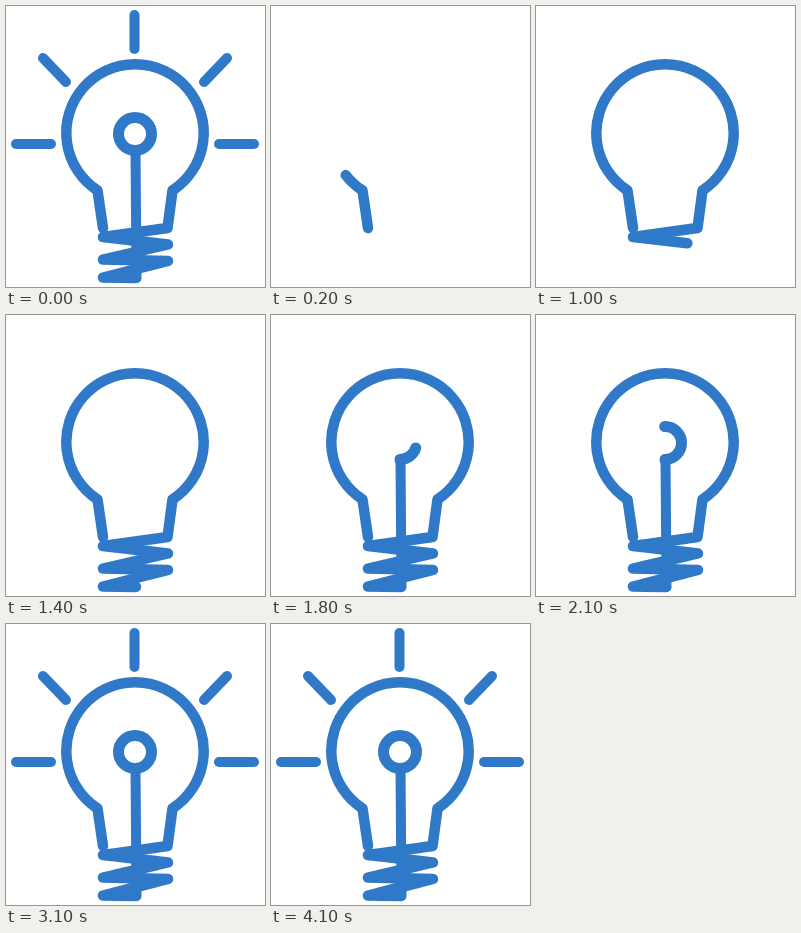
Write an HTML page that moves like this. It is 259 px wide and 281 px high and loops after 5100 ms.

```html
<!DOCTYPE html>
<html lang="en">
<head>
<meta charset="utf-8">
<title>Light bulb</title>
<style>
  html, body { margin: 0; width: 100%; height: 100%; overflow: hidden; background: #fff; }
  svg { display: block; width: 259px; height: 281px; }
  path { fill: none; stroke: #2f79c8; stroke-width: 10; stroke-linecap: round; stroke-linejoin: round; }
</style>
</head>
<body>
<svg viewBox="0 0 259 281"></svg>
<script>
const LOOP = 5100, STEP = 100;
const svg = document.querySelector('svg');

// path, start ms, end ms, stroke width
const parts = [
  ['M97 222L91.5 184.5A68.7 68.7 0 1 1 166.5 184.5L161.5 222L97 231L162 238.5L97 253.5L162 255L97 271.5L130 272',
    100, 1400, 10.5],
  ['M130.5 272L129.5 144', 1400, 1600, 10],
  ['M129 144.5A16.5 16.5 0 0 0 129 111.5A16.5 16.5 0 0 0 129 144.5', 1600, 2600, 11],
  ['M10 138H45', 2500, 2600, 10],
  ['M37 52L60 76', 2600, 2700, 10],
  ['M128.5 9V43', 2700, 2800, 10],
  ['M221 52L198 76', 2800, 2900, 10],
  ['M213 138H248', 2900, 3000, 10]
].map(([d, start, end, width]) => {
  const el = document.createElementNS('http://www.w3.org/2000/svg', 'path');
  el.setAttribute('d', d);
  el.style.strokeWidth = width;
  svg.append(el);
  return { el, start, end, length: el.getTotalLength() };
});

function draw(now) {
  const t = Math.floor((now % LOOP) / STEP) * STEP;
  for (const { el, start, end, length } of parts) {
    const p = t < STEP ? 1 : Math.min(1, Math.max(0, (t - start) / (end - start)));
    el.style.visibility = p > 0 ? 'visible' : 'hidden';
    el.style.strokeDasharray = p < 1 ? `${p * length} ${length * 2}` : 'none';
  }
}

const origin = performance.now();
function tick() {
  draw(performance.now() - origin);
  requestAnimationFrame(tick);
}
tick();
</script>
</body>
</html>
```
